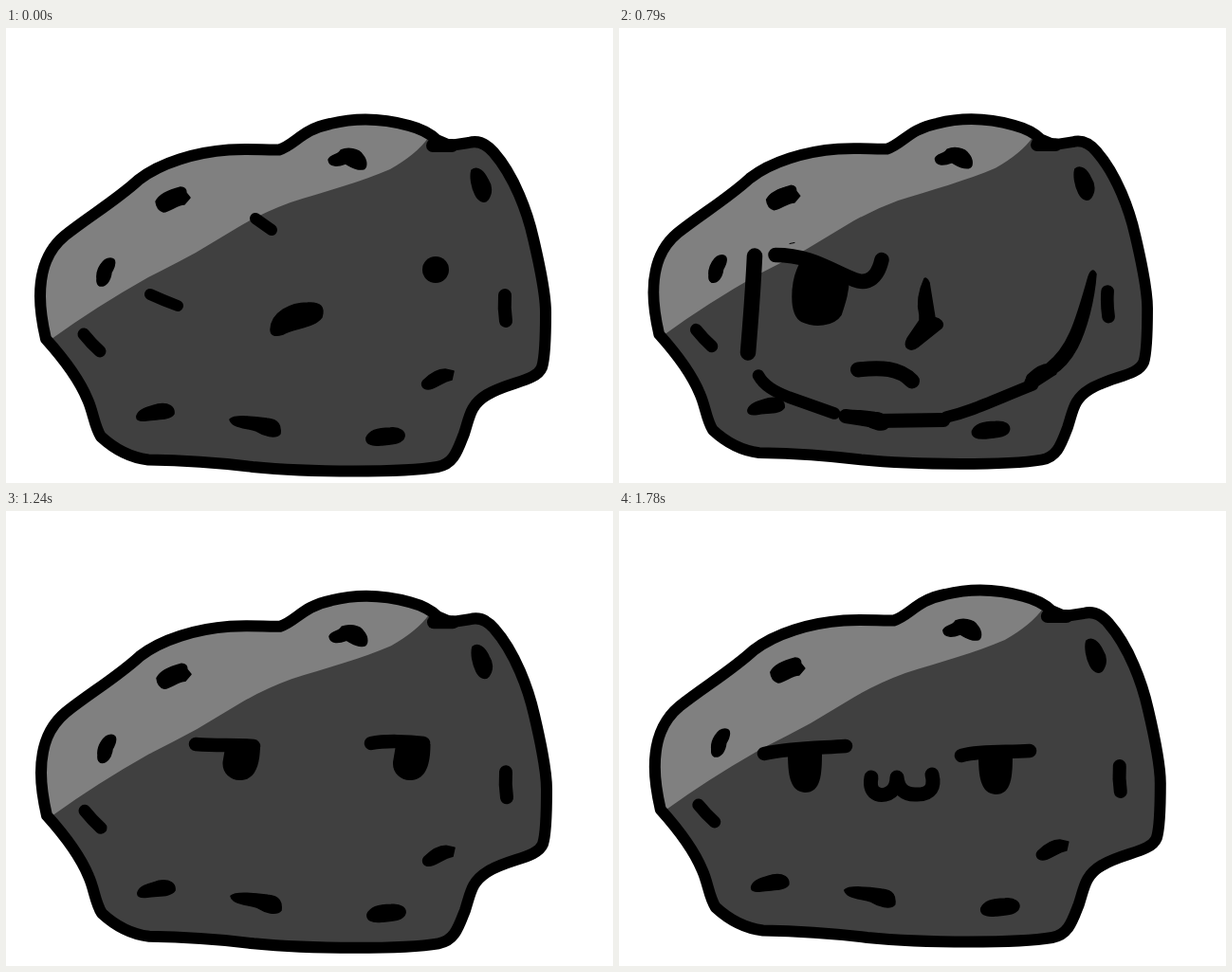
Recreate the animation shown at these times as an HTML page. Size 640 by 480 pixels, loop 1920 ms.

```html
<!DOCTYPE html>
<html lang="en">
<head>
<meta charset="utf-8">
<title>Rock with a changing face</title>
<style>
  html, body { margin: 0; width: 100%; height: 100%; overflow: hidden; background: #fff; }
  svg { display: block; width: 100vw; height: 100vh; }
  .line { fill: none; stroke: #000; stroke-linecap: round; stroke-linejoin: round; }
  .blob { stroke: #000; stroke-width: 1.5; stroke-linejoin: round; }
</style>
</head>
<body>
<svg viewBox="0 0 640 480">
  <defs>
    <path id="outline" d="M288 128.5C305 123 312 107 342 101C370 94 400 96 425 103Q444 108 454 118L468 124L488 121Q502 117 514 131C536 156 550 195 556 222C564 256 569 285 569 300C569 320 569 346 565 358C559 373 530 373 507 387C489 398 489 410 483 428C476 446 472 460 455 463C420 469 320 469 260 463C220 458 180 456 150 455.5C130 453 114 444 100 431C93 420 92 405 86 392C77 370 60 348 42 328C39 315 36 300 36 283C36 254 44 234 62 219C87 199 116 182 140 160C163 142 200 131 235 128.5C255 127 275 129 288 128.5Z"/>
    <clipPath id="inside"><use href="#outline"/></clipPath>
  </defs>

  <g id="rock">
    <use href="#outline" fill="#404040"/>
    <path clip-path="url(#inside)" fill="#808080" d="M40 333L48 328Q95 294 150 263Q176 250 200 237L245 210Q270 195 300 184C335 173 375 162 405 149Q433 133 445 116V80H20V333Z"/>
    <use href="#outline" class="line" stroke-width="12"/>
    <path class="line" stroke-width="14" d="M450 124H470"/>

    <!-- pits that are always there -->
    <path class="blob" d="M158 183C162 175 172 171 184 168Q190 168 190 174L194 179L188 186C180 186 174 193 166 194Q159 192 158 183Z
      M340 139C342 133 350 135 353 129C360 126 372 127 376 134C381 140 381 148 376 149C368 150 362 145 358 143C350 146 341 147 340 139Z
      M96 264C95 255 102 243 110 243C117 243 115 251 111 258C110 267 105 273 99 272C95 270 96 267 96 264Z
      M491 150C497 145 504 151 508 160C512 166 513 174 508 181C504 186 498 182 495 176C491 168 489 157 491 150Z
      M138 409C140 402 150 400 160 397C172 395 178 400 177 407C172 414 160 412 148 414C140 415 137 413 138 409Z
      M380 432C383 425 392 422 405 422C416 421 421 426 420 431C418 439 405 439 395 440C384 441 379 438 380 432Z
      M236 413C240 408 262 410 275 412C288 413 290 420 289 428C284 434 272 430 264 425C250 421 238 421 236 413Z
      M440 372C446 366 455 360 463 360L472 362L470 371C460 373 452 381 445 381C439 381 437 376 440 372Z"/>
    <path class="line" stroke-width="14" d="M526 282Q525 295 527 309"/>
    <path class="line" stroke-width="13" d="M82 323Q90 333 99 341"/>

    <g data-part="bare">
      <path class="blob" d="M279 318C280 300 300 290 318 290C332 289 336 295 333 305C325 316 305 316 292 323C283 326 279 324 279 318Z"/>
      <circle cx="453" cy="255" r="14"/>
      <path class="line" stroke-width="12" d="M263 201L280 213M152 281Q165 287 181 293"/>
    </g>
  </g>

  <g id="face">
    <g data-part="frown">
      <path class="line" stroke-width="16.5" d="M142 238Q140 280 135 340"/>
      <path class="blob" d="M321 262C315 275 313 288 316 300V306L303 325C298 335 306 340 314 334L339 314C343 308 337 304 332 303L326 266Q323 260 321 262Z"/>
      <path class="line" stroke-width="16" d="M251 358C275 355 295 356 308 370"/>
      <path class="line" stroke-width="12.5" d="M146 364C152 375 163 381 178 387L226 404M344 408C370 402 390 392 435 374"/>
      <path class="line" stroke-width="15" d="M238 407L270 412L341 411M434 371L454 358"/>
      <path class="blob" d="M450 352C472 335 480 310 494 260Q498 249 502 257C500 285 492 315 482 335Q472 354 456 364Z"/>
    </g>
    <g data-part="leftEye">
      <path class="blob" d="M190 246C180 265 178 300 192 307C205 313 225 312 233 300C238 285 241 275 241 262L225 248Z"/>
      <path class="line" stroke-width="15.5" d="M164 237C200 237 220 252 247 263C262 269 272 260 276 242"/>
      <path class="line" stroke-width="1" d="M179 225L184 224"/>
    </g>
    <g data-part="rightEye">
      <path class="blob" d="M388 285C383 305 382 328 393 332C410 337 425 328 430 312C433 300 434 290 433 276Z"/>
      <path class="line" stroke-width="16" d="M376 256C378 270 388 283 401 283C425 280 455 272 481 265"/>
    </g>
    <g data-part="glance">
      <path id="eye" d="M229 262C226 275 236 285 248 284C262 283 268 270 268 246L231 250Z"/>
      <use href="#eye" x="179.5"/>
      <path class="line" stroke-width="14.5" d="M200 246C225 248 240 246 261 248M385 245C400 242 425 243 440 245"/>
    </g>
    <g data-part="smug">
      <path id="lid" d="M178 254C178 278 180 296 196 297C213 297 214 278 214 254Z"/>
      <use href="#lid" x="201" y="2"/>
      <path class="line" stroke-width="14.5" d="M153 256C180 250 210 250 239 248M361 258C385 252 410 255 433 253"/>
      <path class="line" stroke-width="15" d="M266 281C262 302 280 302 287 296Q293 291 293 281Q295 299 312 299C330 300 333 290 330 278"/>
    </g>
  </g>

  <g data-part="smudge">
    <path d="M293 0Q362 6 432 0Z"/>
    <path fill="#404040" d="M543 362L555 355L553 366ZM498 385Q515 382 526 375L508 376Z"/>
  </g>
</svg>

<script>
const LOOP = 1920;
const small = (x, y) => `matrix(.977 0 0 .98 ${x} ${y})`;
const shift = (x, y) => `translate(${x} ${y})`;

const poses = [
  { end: 280, rock: shift(0, 0), face: shift(0, 0), parts: ['bare'] },
  { end: 600, rock: small(-1.6, .8), face: shift(-1, 2), parts: ['frown', 'smudge'] },
  { end: 920, rock: small(1.2, 1.7), face: shift(1, 2.5), parts: ['frown', 'leftEye'] },
  { end: 1240, rock: small(0, -1.3), face: shift(0, 0), parts: ['frown', 'leftEye', 'rightEye'] },
  { end: 1560, rock: shift(1, -6.7), face: shift(0, 0), parts: ['glance'] },
  { end: LOOP, rock: shift(1.8, -13), face: shift(0, 0), parts: ['smug'] }
];

const rock = document.getElementById('rock');
const face = document.getElementById('face');
const parts = document.querySelectorAll('[data-part]');
const start = performance.now();

function draw() {
  const time = Math.max(0, performance.now() - start) % LOOP;
  const pose = poses.find(p => time < p.end);
  rock.setAttribute('transform', pose.rock);
  face.setAttribute('transform', pose.face);
  for (const part of parts) {
    part.style.display = pose.parts.includes(part.dataset.part) ? '' : 'none';
  }
  requestAnimationFrame(draw);
}
draw();
</script>
</body>
</html>
```
